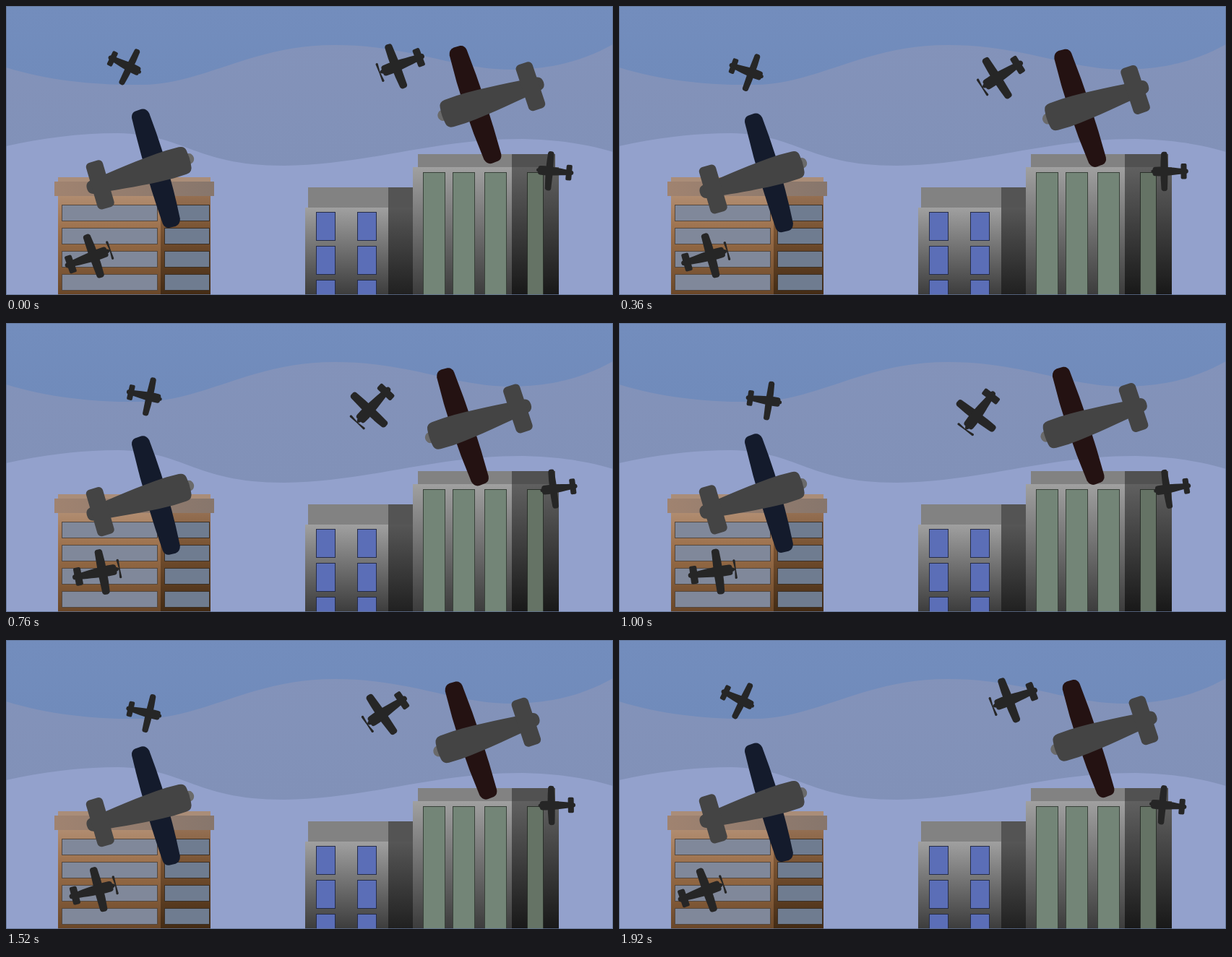
These frames come from a looping animation (840 by 400 pixels, 1960 ms). An HTML page:

```html
<!DOCTYPE html>
<html lang="en">
<head>
<meta charset="utf-8">
<title>Planes over the city</title>
<style>
  html, body { margin: 0; width: 100%; height: 100%; overflow: hidden; background: #93a1cc; }
  svg { display: block; width: 840px; height: 400px; }
</style>
</head>
<body>
<svg viewBox="0 0 840 400">
  <defs>
    <linearGradient id="top" x2="0" y2="1">
      <stop stop-color="#738dbd"/><stop offset="1" stop-color="#708bbb"/>
    </linearGradient>
    <linearGradient id="haze" x2="0" y2="1">
      <stop stop-color="#8493ba"/><stop offset="1" stop-color="#8191b8"/>
    </linearGradient>
    <linearGradient id="cornice">
      <stop stop-color="#a08370"/><stop offset="1" stop-color="#87766c"/>
    </linearGradient>
    <linearGradient id="brick" x2="0" y2="1">
      <stop stop-color="#b08c70"/><stop offset=".35" stop-color="#9c704b"/><stop offset="1" stop-color="#6a4728"/>
    </linearGradient>
    <linearGradient id="brickSide" x2="0" y2="1">
      <stop stop-color="#946f52"/><stop offset=".35" stop-color="#785231"/><stop offset="1" stop-color="#432b14"/>
    </linearGradient>
    <linearGradient id="stone" x2="0" y2="1">
      <stop stop-color="#a0a0a0"/><stop offset="1" stop-color="#3c3c3c"/>
    </linearGradient>
    <linearGradient id="stoneSide" x2="0" y2="1">
      <stop stop-color="#565656"/><stop offset="1" stop-color="#202020"/>
    </linearGradient>
    <linearGradient id="towerSide" x2="0" y2="1">
      <stop stop-color="#606060"/><stop offset="1" stop-color="#181818"/>
    </linearGradient>
    <path id="wing" d="M-6,-84 L3,-84.5 Q10,-84 12,-76 Q18,0 12,76 Q10,84 3,84.5 L-6,84 Q-12,83 -13,76 Q-17,0 -13,-76 Q-12,-83 -6,-84Z"/>
    <g id="body">
      <path d="M38,-19.5 Q46,-19 47,-12 Q49,0 47,12 Q46,19 38,19.5 L20,20 C-20,19 -60,13 -93,9.5 Q-100,8 -100,0 Q-100,-8 -93,-9.5 C-60,-13 -20,-19 20,-20Z"/>
      <rect x="-93" y="-33.5" width="24" height="67" rx="6"/>
    </g>
    <ellipse id="spinner" cx="47" rx="7" ry="7.5"/>
    <path id="prop" d="M50,-3 H55 L52,-33 Q56,-39 60,-33 L59,0 L60,33 Q56,39 52,33 L55,3 H50Z"/>
  </defs>
  <rect width="840" height="400" fill="#93a1cc"/>
  <path fill="url(#haze)" d="M0,0H840V202C810,193 770,185 715,184C590,184 500,220 385,221C260,221 250,178 155,176C100,176 50,183 0,194Z"/>
  <path fill="url(#top)" d="M0,0H840V53C800,75 760,87 700,88C620,88 560,54 455,54C340,54 280,106 190,109C130,110 60,104 0,85Z"/>
  <g id="city"></g>
  <g id="sky"></g>
  <rect x=".5" y=".5" width="839" height="399" fill="none" stroke="#5f7191" stroke-opacity=".8"/>
</svg>
<script>
const NS = 'http://www.w3.org/2000/svg';
const byId = id => document.getElementById(id);

function add(parent, tag, attrs) {
  const el = document.createElementNS(NS, tag);
  for (const key in attrs) el.setAttribute(key, attrs[key]);
  return parent.appendChild(el);
}

const city = byId('city');
const block = (x, y, right, bottom, fill) =>
  add(city, 'rect', { x, y, width: right - x, height: bottom - y, fill });

// Pane with a thin dark frame
function pane(x, y, right, bottom, fill, edge) {
  block(x, y, right, bottom, edge);
  block(x + 1, y + 1, right - 1, bottom - 1, fill);
}

// Brown office
block(72, 237, 283, 244, '#aa8d78');
block(72, 263, 214, 400, 'url(#brick)');
block(214, 263, 283, 400, 'url(#brickSide)');
block(67, 243, 288, 263, 'url(#cornice)');
for (let y = 275; y < 400; y += 32) {
  pane(77, y, 210, y + 23, '#80889a', '#54483f');
  pane(219, y, 282, y + 23, '#6f7c90', '#3b3026');
}

// Low grey block
block(418, 251, 529, 279, '#828282');
block(529, 251, 563, 279, '#545454');
block(414, 279, 529, 400, 'url(#stone)');
block(529, 279, 563, 400, 'url(#stoneSide)');
for (const x of [429, 486])
  for (const y of [285, 332, 379]) pane(x, y, x + 27, y + 40, '#5b6eb7', '#252c48');

// Tower
block(570, 205, 700, 223, '#828282');
block(700, 205, 760, 223, '#515151');
block(563, 223, 700, 400, 'url(#stone)');
block(700, 223, 765, 400, 'url(#towerSide)');
for (const x of [577, 618, 662]) pane(x, 230, x + 31, 401, '#738577', '#384139');
pane(721, 230, 744, 401, '#657365', '#2a302a');

// Each plane drifts from `from` to `from + by` at step `turn`, then back: [x, y, degrees]
const DARK = '#262626';
const planes = [
  { from: [171, 84.5, 26], by: [46, 29, -22], turn: 30, scale: [.325, .32] },
  { from: [539.5, 83.5, 159], by: [-47.5, 47, -33], turn: 23, scale: [.42, .385], prop: true },
  { from: [121.5, 346, -19.5], by: [15.8, -2, 11.5], turn: 24, scale: [.42, .375], prop: true },
  { from: [752, 228.3, 185], by: [6.6, 1.7, -15], turn: 22, scale: [.335, .322] },
  { from: [208, 224.7, -16.3], by: [0, 13.7, 0], turn: 18, scale: [1, 1], wing: '#141b2c' },
  { from: [649, 136.7, 161.7], by: [-19.9, 8.2, 0], turn: 14, scale: [1, 1], wing: '#241212' }
];

for (const plane of planes) {
  const g = plane.el = add(byId('sky'), 'g', {});
  const part = (id, fill) => add(g, 'use', { href: '#' + id, fill });
  part('spinner', plane.wing ? '#6a6a6a' : DARK);
  part('wing', plane.wing || DARK);
  part('body', plane.wing ? '#444444' : DARK);
  if (plane.prop) part('prop', DARK);
}

const LOOP = 1960, STEP = 40, LAST = 47;

function draw(now) {
  const step = Math.max(0, Math.floor(now % LOOP / STEP) - 1);
  for (const { el, from, by, turn, scale } of planes) {
    const k = step < turn ? step / turn : (LAST - step) / (LAST - turn);
    const [x, y, angle] = from.map((v, i) => v + by[i] * k);
    el.setAttribute('transform', `translate(${x} ${y}) rotate(${angle}) scale(${scale})`);
  }
}

const start = performance.now();
function tick() {
  draw(performance.now() - start);
  requestAnimationFrame(tick);
}
tick();
</script>
</body>
</html>
```
